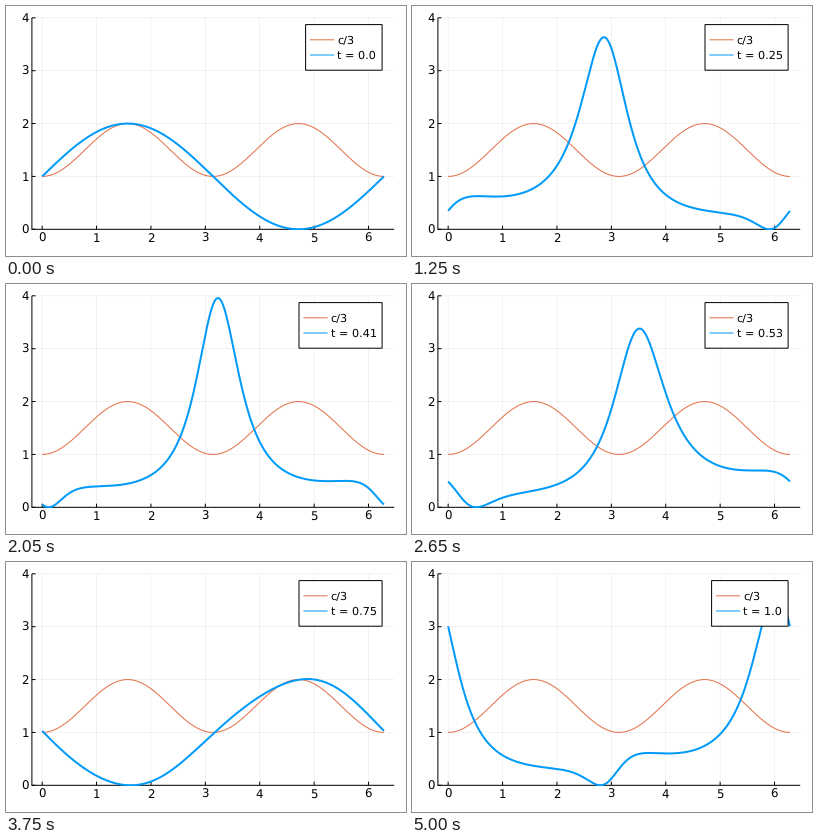
Animation, 400 px wide and 250 px high, one loop 5050 ms. Source, as a matplotlib script:

```python
import numpy as np
import matplotlib.pyplot as plt
from matplotlib.animation import FuncAnimation
from matplotlib.patches import Rectangle

W, H, DPI = 400, 250, 100
LEFT, RIGHT, TOP, BOTTOM = 25.9, 388.19, 11.81, 223.3
BLUE, ORANGE = "#009afa", "#e36f47"
PX = 72 / DPI
TICK_FONT, KEY_FONT = 11.8 * PX, 11.2 * PX
N_FRAMES, INTERVAL = 101, 50
ROOT2 = np.sqrt(2)

plt.rcParams["font.family"] = "DejaVu Sans"
plt.rcParams["text.hinting"] = "none"


def to_x(x):
    span = (RIGHT - LEFT) / 1.06
    return LEFT + 0.03 * span + span * x / (2 * np.pi)


def to_y(y):
    return BOTTOM - (BOTTOM - TOP) * y / 4


def speed(x):
    return 3 * (1 + np.sin(x) ** 2)


def density(x, t):
    """Exact solution of u_t + (c u)_x = 0 with u(x, 0) = 1 + sin x."""
    phase = np.arctan2(ROOT2 * np.sin(x), np.cos(x)) - 3 * ROOT2 * t
    x0 = np.arctan2(np.sin(phase), ROOT2 * np.cos(phase))
    return (1 + np.sin(x0)) * speed(x0) / speed(x)


fig = plt.figure(figsize=(W / DPI, H / DPI), dpi=DPI, facecolor="white")
ax = fig.add_axes([0, 0, 1, 1])
ax.set_xlim(0, W)
ax.set_ylim(H, 0)
ax.axis("off")


def line(xs, ys, color="black", width=1.0, z=3, **kw):
    return ax.plot(xs, ys, color=color, lw=width * PX, zorder=z, snap=False,
                   solid_capstyle="butt", **kw)[0]


def label(x, y, text, size, z=3, **kw):
    return ax.text(x, y, text, fontsize=size, zorder=z, va="baseline", **kw)


# Grid, ticks and axes
for k in range(7):
    px = to_x(k)
    line([px, px], [TOP, BOTTOM], width=0.5, z=1, alpha=0.1)
    line([px, px], [BOTTOM, BOTTOM - 3.6])
    label(px - 0.2, 236.2, str(k), TICK_FONT, ha="center")
for k in range(5):
    py = to_y(k)
    line([LEFT, RIGHT], [py, py], width=0.5, z=1, alpha=0.1)
    line([LEFT, LEFT + 3.6], [py, py])
    label(22.8, py + 4.4, str(k), TICK_FONT, ha="right")
line([LEFT, LEFT], [TOP, BOTTOM + 0.5])
line([LEFT, RIGHT], [BOTTOM, BOTTOM])

# Curves
xs = np.linspace(0, 2 * np.pi, 500)
clip = Rectangle((LEFT, TOP - 0.5), RIGHT - LEFT, BOTTOM - TOP + 1,
                 transform=ax.transData)
line(to_x(xs), to_y(speed(xs) / 3), ORANGE, z=4)
wave = line(to_x(xs), to_y(density(xs, 0)), BLUE, 2, z=5)
wave.set_clip_path(clip)

# Legend
BOX_RIGHT, BOX_TOP, ROW = 376.1, 18.6, 15.2
rows = [BOX_TOP + ROW, BOX_TOP + 2 * ROW]
box = ax.add_patch(Rectangle((0, BOX_TOP), 1, 3 * ROW, snap=False,
                             fc="white", ec="black", lw=PX, zorder=6))
keys = [line([0, 0], [y, y], color, z=7)
        for y, color in zip(rows, (ORANGE, BLUE))]
names = [label(0, y + 4.2, "c/3", KEY_FONT, z=7) for y in rows]


def update(i):
    t = round(i / 100, 2)
    wave.set_ydata(to_y(density(xs, t)))
    text = str(t)
    left = 299.6 if len(text) == 3 else 293
    box.set_x(left)
    box.set_width(BOX_RIGHT - left)
    for key, name in zip(keys, names):
        key.set_xdata([left + 4.4, left + 28.6])
        name.set_x(left + 31.6)
    names[1].set_text(f"t = {text}")
    return [wave, box, *keys, *names]


anim = FuncAnimation(fig, update, frames=N_FRAMES, interval=INTERVAL,
                     init_func=lambda: update(0), repeat=True, repeat_delay=0)
plt.show()
```
